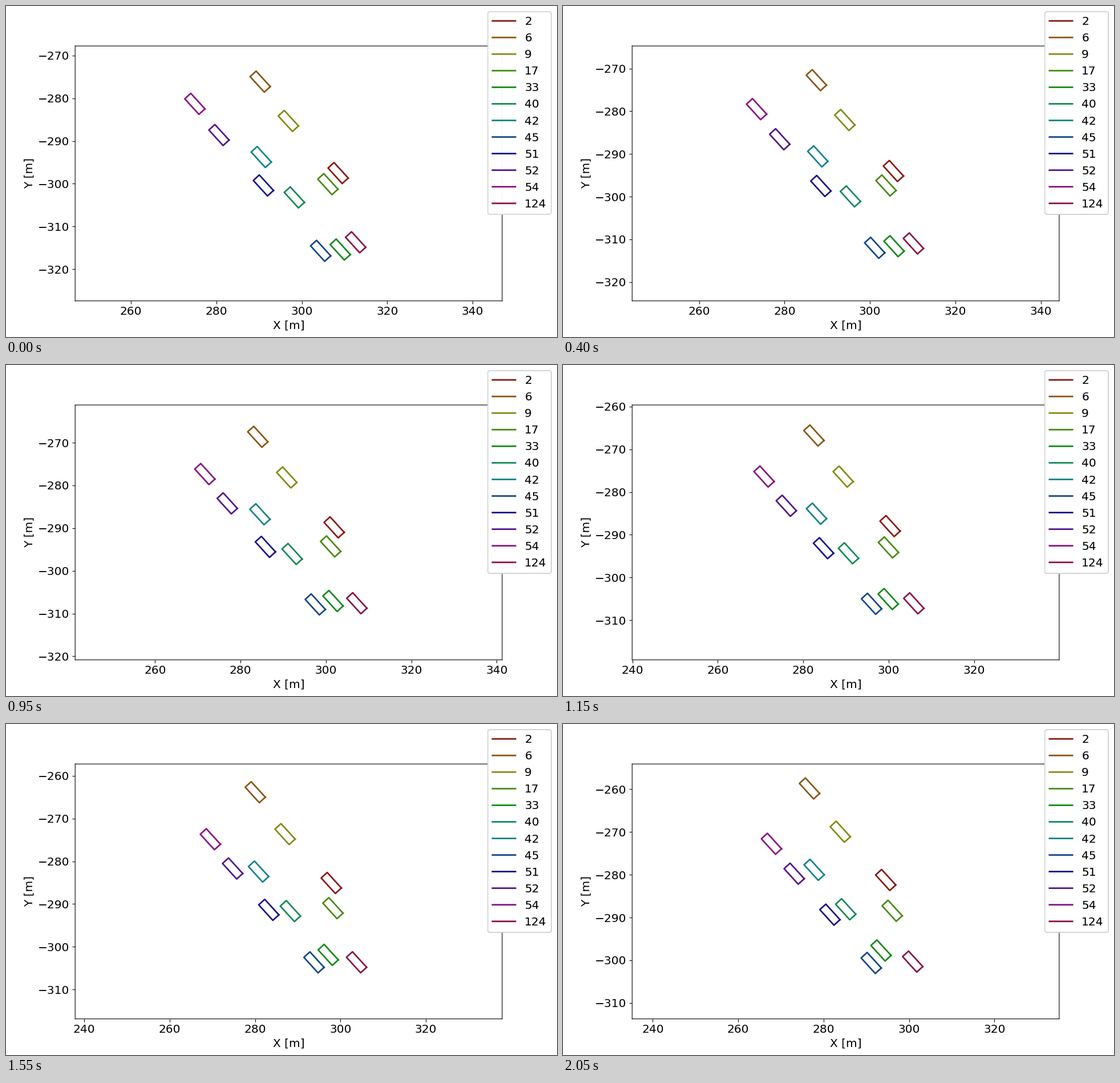
Animation, 966 px wide and 580 px high, one loop 2.1 s. Source, as a matplotlib script:

```python
import colorsys

import matplotlib.pyplot as plt
import numpy as np
from matplotlib.animation import FuncAnimation
from matplotlib.ticker import MultipleLocator

FRAMES, INTERVAL = 42, 50
STEPS = 44                    # logged time steps in one loop
W, H, DPI = 966, 580, 100
SPAN = 100.0                  # visible width in metres
HALF_H = SPAN / 2 * (0.77 * H) / (0.775 * W)
LENGTH, WIDTH, HEADING = 4.92, 1.91, 47.6

# id: start x, start y in metres, first and last speed in metres per loop
CARS = {
    2: (308.5, -297.5, 22.9, 20.0),
    6: (290.25, -276.1, 21.5, 20.9),
    9: (296.85, -285.3, 21.0, 19.2),
    17: (306.1, -300.1, 18.1, 12.7),
    33: (309.0, -315.4, 25.2, 21.9),
    40: (298.25, -303.2, 21.4, 18.6),
    42: (290.5, -293.75, 20.7, 18.5),
    45: (304.4, -315.7, 25.4, 14.7),
    51: (291.0, -300.4, 19.8, 9.4),
    52: (280.6, -288.6, 13.5, 9.7),
    54: (274.95, -281.3, 11.5, 10.8),
    124: (312.6, -313.7, 18.0, 17.6),
}
X0, Y0, V0, V1 = np.array(list(CARS.values())).T
# The road bends slightly further along
COURSE = np.radians(49.4 + 0.041 * (Y0 - Y0.mean()))


def positions(p):
    """Car centres at progress p, each with an even change of speed."""
    run = V0 * p + (V1 - V0) * p * p / 2
    return X0 - run * np.cos(COURSE), Y0 + run * np.sin(COURSE)


def outline():
    """Closed car rectangle around the origin."""
    a = -np.radians(HEADING)
    x = np.array([1, 1, -1, -1, 1]) * LENGTH / 2
    y = np.array([1, -1, -1, 1, 1]) * WIDTH / 2
    return x * np.cos(a) - y * np.sin(a), x * np.sin(a) + y * np.cos(a)


plt.rcParams.update({"font.family": "DejaVu Sans", "font.size": 14.5,
                     "path.snap": False})
fig, ax = plt.subplots(figsize=(W / DPI, H / DPI), dpi=DPI)
dx, dy = 0.48 / W, 0.48 / H   # half a pixel right and down
fig.subplots_adjust(left=0.125 + dx, right=0.9 + dx,
                    bottom=0.11 - dy, top=0.88 - dy)
ax.set_xlabel("X [m]")
ax.set_ylabel("Y [m]")
ax.xaxis.set_major_locator(MultipleLocator(20))
ax.yaxis.set_major_locator(MultipleLocator(10))

box_x, box_y = outline()
lines = []
for k, name in enumerate(CARS):
    color = colorsys.hls_to_rgb(0.01 + k / len(CARS), 0.3, 0.8)
    lines += ax.plot([], [], color=color, lw=1.93, label=str(name))

# Translucent legends pile up over the first frames
legends = [fig.legend(loc="upper right") for _ in range(5)]


def update(i):
    # Nearest logged step: now and then one is skipped
    step = np.ceil(i * (STEPS + 1) / FRAMES - 0.5)
    xs, ys = positions(step / STEPS)
    cx, cy = xs.mean(), ys.mean()
    ax.set_xlim(cx - SPAN / 2, cx + SPAN / 2)
    ax.set_ylim(cy - HALF_H, cy + HALF_H)
    for line, x, y in zip(lines, xs, ys):
        line.set_data(x + box_x, y + box_y)
    for k, legend in enumerate(legends):
        legend.set_visible(k < i + 2)
    return lines


anim = FuncAnimation(fig, update, frames=FRAMES, interval=INTERVAL,
                     repeat=True, repeat_delay=0)
plt.show()
```
